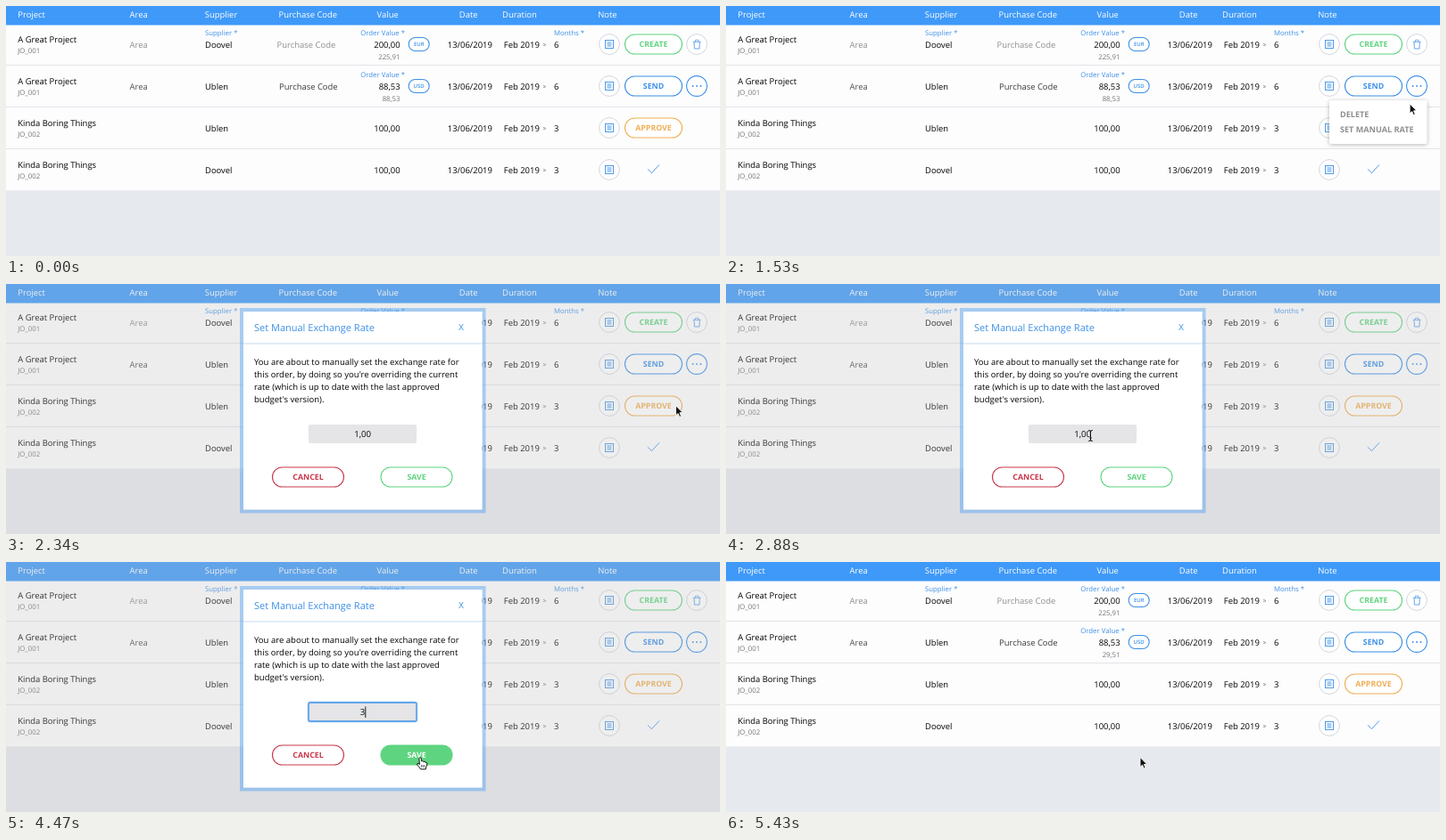
Write an HTML page with a canvas that moves like this. It is 800 px wide and 281 px high and loops after 5460 ms.

```html
<!DOCTYPE html>
<html lang="en">
<head>
<meta charset="utf-8">
<title>Order table with manual exchange rate</title>
<style>
  html, body { margin: 0; width: 100%; height: 100%; overflow: hidden; background: #e6e9ee; }
  canvas { display: block; width: 800px; height: 281px; }
</style>
</head>
<body>
<canvas id="stage"></canvas>
<script>
const W = 800, H = 281, LOOP = 5460;
const BAR = '#3f99f8', BLUE = '#3d90e6', GREEN = '#5fd480', ORANGE = '#f0ae55', RED = '#c9364a';
const INK = '#050506', GREY = '#8f8f92', SUB = '#737377', LINE = '#d3d6dc';
const FONT = '"Open Sans", "Noto Sans", sans-serif';

// Moments of the story, in ms
const T = { menu: 1200, modal: 2190, focus: 3200, select: 3300, type: 3990, save: 4740, rate: 5000 };
const FADE = 120;

// Pointer stops: time, x, y
const PATH = [
  [0, 738, 292], [60, 738, 286], [640, 773, 98], [1340, 773, 98], [1860, 750.5, 136.8],
  [2400, 750.5, 136.8], [2840, 408.5, 170.5], [4060, 408.5, 170.5], [4390, 464, 219.5], [LOOP, 464, 219.5]
];

const canvas = document.getElementById('stage');
const c = canvas.getContext('2d');
const dpr = window.devicePixelRatio || 1;
canvas.width = W * dpr;
canvas.height = H * dpr;
c.textRendering = 'geometricPrecision';

const clamp = v => Math.max(0, Math.min(1, v));
const ease = v => v * v * (3 - 2 * v);

function pointerAt(t) {
  const i = Math.max(1, PATH.findIndex(p => p[0] > t));
  const [t0, x0, y0] = PATH[i - 1], [t1, x1, y1] = PATH[i];
  const k = ease(clamp((t - t0) / (t1 - t0)));
  return { x: x0 + (x1 - x0) * k, y: y0 + (y1 - y0) * k };
}

function text(s, x, y, color = INK, size = 9.45, align = 'left', weight = 400) {
  c.font = `${weight} ${size}px ${FONT}`;
  c.textAlign = align;
  c.fillStyle = color;
  c.fillText(s, x, y);
}

function rect(x, y, w, h, color) {
  c.fillStyle = color;
  c.fillRect(x, y, w, h);
}

function paint(fill, stroke, width = 1) {
  if (fill) { c.fillStyle = fill; c.fill(); }
  if (stroke) { c.strokeStyle = stroke; c.lineWidth = width; c.stroke(); }
}

function round(x, y, w, h, r, fill, stroke, width) {
  c.beginPath();
  c.roundRect(x, y, w, h, r);
  paint(fill, stroke, width);
}

function circle(x, y, r, fill, stroke, width) {
  c.beginPath();
  c.arc(x, y, r, 0, Math.PI * 2);
  paint(fill, stroke, width);
}

function poly(points, fill, stroke, width, close) {
  c.beginPath();
  points.forEach(([x, y]) => c.lineTo(x, y));
  if (close) c.closePath();
  paint(fill, stroke, width);
}

function pill(label, x, y, w, color, filled) {
  round(x + .5, y - 11, w - 1, 22, 11, filled ? color : '#fff', color, 1.1);
  text(label, x + w / 2, y + 3.2, filled ? '#fff' : color, 8.8, 'center', 700);
}

function noteButton(y) {
  circle(676, y, 11.4, '#fff', LINE);
  c.strokeStyle = BLUE;
  c.lineWidth = .9;
  c.strokeRect(671.5, y - 4.5, 9, 9);
  for (let i = -2; i <= 2; i += 2) rect(673.5, y + i - .5, 5, .9, BLUE);
}

function trashButton(y) {
  circle(774, y, 11.4, '#fff', LINE);
  poly([[771, y - 2.5], [771.4, y + 5], [776.9, y + 5], [777.3, y - 2.5]], null, BLUE, .8);
  poly([[769.8, y - 2.7], [778.5, y - 2.7]], null, BLUE, .8);
  poly([[772.4, y - 3], [772.4, y - 4.8], [775.9, y - 4.8], [775.9, y - 3]], null, BLUE, .7);
}

function dotsButton(y, hover) {
  circle(774, y, 11.4, hover ? BAR : '#fff', BLUE, 1.1);
  for (let i = -1; i <= 1; i++) circle(774 + i * 4.4, y, .95, hover ? '#fff' : BLUE);
}

function currency(code, y) {
  round(451.2, y - 7.5, 23, 15, 7.5, '#fff', BLUE, 1.1);
  text(code, 462.7, y + 2.2, BLUE, 6, 'center', 600);
}

function row(y, name, id, supplier, value, months) {
  text(name, 13.3, y - 1.6);
  text(id, 13.2, y + 10.2, SUB, 7.8);
  text(supplier, 223, y + 3.5);
  text(value, 441.6, y + 3.5, INK, 9.45, 'right');
  text('13/06/2019', 494.8, y + 3.5);
  text('Feb 2019', 557.8, y + 3.5);
  text('>', 601.6, y + 2.8, '#444', 6.8);
  text(months, 614, y + 3.5);
  noteButton(y);
}

function orderDetails(y, sub, code, tone) {
  const label = (s, x) => text(s, x, y - 9.6, BLUE, 7.8);
  text('Area', 138.6, y + 3.5, tone);
  label('Order Value *', 397.2);
  text(sub, 441.4, y + 16.6, SUB, 7.8, 'right');
  currency(code, y);
  return label;
}

function table(t, hoverDots) {
  rect(0, 0, W, H, '#e6e9ee');
  rect(0, 20, W, 187.3, '#fdfdfe');
  rect(0, 0, W, 21.5, BAR);
  for (let y = 66; y < 207; y += 47) rect(0, y, W, 1, '#e3e4e8');

  const heads = { Project: 13.3, Area: 138.6, Supplier: 222.8, 'Purchase Code': 305.5,
    Value: 415.6, Date: 507.8, Duration: 556, Note: 663.2 };
  for (const h in heads) text(h, heads[h], 12.7, '#fff');

  row(43, 'A Great Project', 'JO_001', 'Doovel', '200,00', '6');
  row(90, 'A Great Project', 'JO_001', 'Ublen', '88,53', '6');
  row(137, 'Kinda Boring Things', 'JO_002', 'Ublen', '100,00', '3');
  row(184, 'Kinda Boring Things', 'JO_002', 'Doovel', '100,00', '3');

  const label = orderDetails(43, '225,91', 'EUR', GREY);
  label('Supplier *', 223);
  label('Months *', 614);
  text('Purchase Code', 303.6, 46.5, GREY);
  orderDetails(90, t < T.rate ? '88,53' : '29,51', 'USD', '#505053');
  text('Purchase Code', 306, 93.5, '#3c3c3f');

  pill('CREATE', 693, 43, 65, GREEN);
  trashButton(43);
  pill('SEND', 693, 90, 65, BLUE);
  dotsButton(90, hoverDots);
  pill('APPROVE', 693, 137, 65, ORANGE);
  poly([[719.2, 183.3], [723.4, 187.7], [732, 178.4]], null, BLUE, .9);
}

function menu(p) {
  c.save();
  c.shadowColor = 'rgba(0,0,0,.28)';
  c.shadowBlur = 5 * dpr;
  c.shadowOffsetY = dpr;
  round(676, 106, 109.5, 49, 2, '#fff');
  c.restore();
  const tone = on => on ? BLUE : GREY;
  text('DELETE', 688, 125.4, tone(p.y > 114 && p.y < 128), 9.1, 'left', 700);
  text('SET MANUAL RATE', 688, 142.2, tone(p.y >= 130), 9.1, 'left', 700);
}

function field(t) {
  const focused = t >= T.focus, typed = t >= T.type;
  const selected = t >= T.select && !typed;
  if (focused) round(337.5, 156.5, 124, 24, 3.5, 'rgba(90,160,235,.35)');
  round(339, 158, 121, 21, 2, '#e5e4e6', focused ? '#65a5e8' : null, 1.8);
  if (selected) rect(389.7, 162.5, 20, 13, '#a5cbf4');
  text(typed ? '3' : '1,00', 399.6, 172, INK, 9.6, 'center');
  if (focused && !selected) rect(typed ? 402.3 : 409.4, 162.5, 1, 12.5, '#222');
}

function modal(t, alpha, hoverSave) {
  c.save();
  c.globalAlpha = alpha;
  rect(0, 0, W, H, 'rgba(193,193,193,.27)');
  c.strokeStyle = 'rgba(63,153,245,.41)';
  c.lineWidth = 4;
  c.strokeRect(264, 29, 271.5, 226.5);
  rect(266, 31, 267.5, 222.5, '#fff');
  rect(266, 66.5, 267.5, 1, '#c5dcf2');
  text('Set Manual Exchange Rate', 278, 53, BLUE, 11);
  text('X', 510, 52, BLUE, 9.8, 'center');
  [
    'You are about to manually set the exchange rate for',
    "this order, by doing so you're overriding the current",
    'rate (which is up to date with the last approved',
    "budget's version)."
  ].forEach((s, i) => text(s, 278, 90.6 + i * 14.25, INK, 9.54));
  field(t);
  pill('CANCEL', 298, 217, 81, RED);
  pill('SAVE', 419.5, 217, 81, GREEN, hoverSave);
  c.restore();
}

function arrow() {
  poly([[0, 0], [0, 11], [2.5, 8.7], [4.2, 12.6], [6.1, 11.8], [4.4, 8], [7.7, 7.8]], '#111', '#fff', .9, true);
}

function hand() {
  c.beginPath();
  c.moveTo(-1.2, 1);
  c.quadraticCurveTo(0, -.8, 1.2, 1);
  c.lineTo(1.6, 4.4);
  c.quadraticCurveTo(3, 3.5, 3.8, 5);
  c.quadraticCurveTo(5.2, 4.2, 6, 5.7);
  c.quadraticCurveTo(7.8, 5.3, 7.8, 7.2);
  c.quadraticCurveTo(7.8, 10, 6.4, 11.6);
  c.lineTo(6.4, 13.4);
  c.lineTo(.6, 13.4);
  c.quadraticCurveTo(-.8, 11.2, -3.2, 8.6);
  c.quadraticCurveTo(-3.9, 6.6, -1.8, 7);
  c.lineTo(-.6, 8);
  c.closePath();
  c.lineJoin = 'round';
  paint('#fff', '#111', 1);
  for (let x = 1.4; x < 6; x += 1.8) poly([[x, 8.6], [x, 11.2]], null, '#111', .7);
}

function beam() {
  const shape = [[-2.2, -6.2], [0, -5.2], [2.2, -6.2]];
  for (const [color, w] of [['#fff', 2.2], ['#111', 1.1]]) {
    poly(shape, null, color, w);
    poly(shape.map(([x, y]) => [x, -y]), null, color, w);
    poly([[0, -5.2], [0, 5.2]], null, color, w);
    poly([[-1.5, 2.5], [1.5, 2.5]], null, color, w * .8);
  }
}

function draw(t) {
  const p = pointerAt(t);
  const modalOpen = t >= T.modal && t < T.save;
  const menuOpen = t >= T.menu && t < T.modal;
  const inside = (x, y, w, h) => p.x > x && p.x < x + w && p.y > y && p.y < y + h;
  const onDots = !modalOpen && Math.hypot(p.x - 774, p.y - 90) < 12;
  const onItem = menuOpen && inside(676, 114, 109, 33);
  const onSave = modalOpen && inside(419, 205, 82, 24);
  const onField = modalOpen && inside(339, 158, 121, 21);

  c.setTransform(dpr, 0, 0, dpr, 0, 0);
  table(t, onDots);
  if (menuOpen) menu(p);
  const alpha = clamp((t - T.modal) / FADE) * clamp(1 - (t - T.save) / FADE);
  if (alpha > 0) modal(t, alpha, onSave || t >= T.save);

  c.save();
  c.translate(p.x, p.y);
  if (onField) beam();
  else if (onDots || onItem || onSave) hand();
  else arrow();
  c.restore();
}

const start = performance.now();
function tick() {
  draw((performance.now() - start) % LOOP);
  requestAnimationFrame(tick);
}
tick();
</script>
</body>
</html>
```
